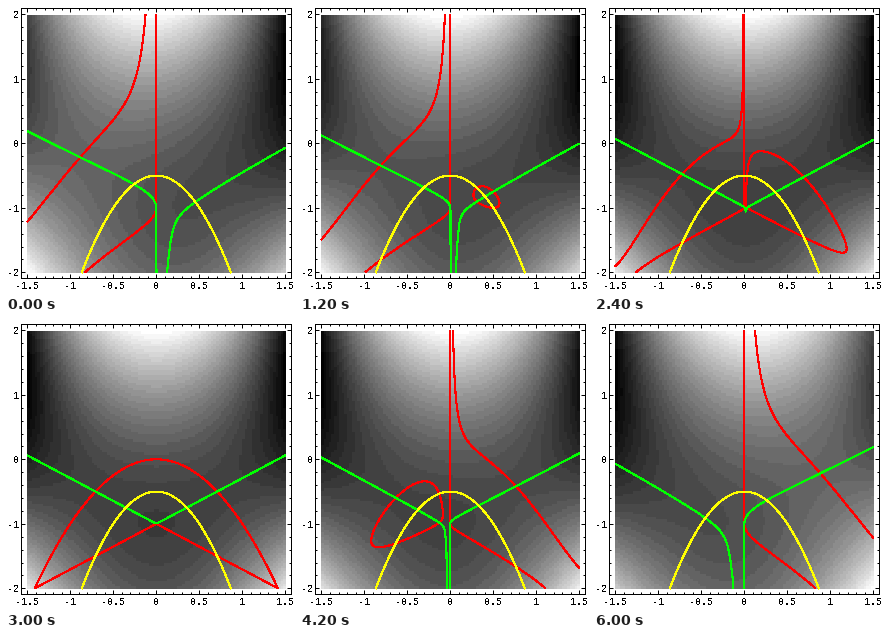
Recreate the animation shown at these times as a matplotlib script. Size 288 px wide and 288 px high, loop 6300 ms.

```python
import numpy as np
import matplotlib.pyplot as plt
from matplotlib.animation import FuncAnimation
from matplotlib.ticker import FormatStrFormatter, MultipleLocator

SIZE, DPI = 288, 72
XM, YM = 1.5, 2.0
# Pixel layout, y measured from the top
LEFT, RIGHT, TOP, BOTTOM = 15, 285, 2, 272
CX, CY = 150.3, 137.3
SX, SY = 86, 64.5
LEVELS = 32
LINE = 1.1

plt.rcParams.update({
    "font.family": "Liberation Mono",
    "font.size": 10,
    "text.antialiased": False,
    "axes.unicode_minus": False,
})

# Tilt of the surface: steps of 1/8, refined around zero
half = np.r_[np.arange(8, 0, -1) / 8, 1 / 16, 1 / 32]
TILT = np.r_[-half, 0, half[::-1]]


def data_box(left, right, top, bottom):
    """Pixel edges to data limits (x0, x1, y0, y1)."""
    return ((left - CX) / SX, (right - CX) / SX,
            (CY - bottom) / SY, (CY - top) / SY)


def grid(n):
    return np.meshgrid(np.linspace(-XM, XM, n), np.linspace(-YM, YM, n))


def potential(x, y, t):
    return y**2 + 2 * y - x**2 - 2 * x**2 * y + t * x


def slope_along(x, y, t, sign):
    """Gradient component along one Hessian eigenvector."""
    p = t - 2 * x - 4 * x * y
    q = 2 * (y + 1 - x**2)
    d = -4 * (y + 1)              # Vxx - Vyy
    b = -4 * x                    # Vxy
    return p * (d + sign * np.hypot(d, 2 * b)) / (2 * b) + q


def shade(t):
    v = potential(*CELLS, t)
    v = (v - v.min()) / (v.max() - v.min())
    return np.round(v * (LEVELS - 1)) / (LEVELS - 1)


CELLS = grid(100)
CURVES = [(grid(400), -1, "#ff0000"), (grid(100), 1, "#00ff00")]

fig = plt.figure(figsize=(SIZE / DPI, SIZE / DPI), dpi=DPI, facecolor="white")
ax = fig.add_axes([LEFT / SIZE, 1 - BOTTOM / SIZE,
                   (RIGHT - LEFT) / SIZE, (BOTTOM - TOP) / SIZE])
limits = data_box(LEFT, RIGHT, TOP, BOTTOM)

for axis, major, minor in ((ax.xaxis, 0.5, 0.1), (ax.yaxis, 1, 0.2)):
    axis.set_major_locator(MultipleLocator(major))
    axis.set_minor_locator(MultipleLocator(minor))
    axis.set_major_formatter(FormatStrFormatter("%g"))
ax.tick_params(which="both", direction="in", top=True, right=True, width=1)
ax.tick_params(which="major", length=4)
ax.tick_params(which="minor", length=2)
ax.tick_params(axis="x", pad=3)
ax.tick_params(axis="y", pad=2)
for spine in ax.spines.values():
    spine.set_linewidth(1)

image = ax.imshow(shade(0), cmap="gray", vmin=0, vmax=1, origin="lower",
                  extent=data_box(21, 280, 9, 267), aspect="auto",
                  interpolation="nearest", zorder=0)

# Zero set of the Hessian determinant
px = np.linspace(-np.sqrt(0.75), np.sqrt(0.75), 80)
ax.plot(px, -0.5 - 2 * px**2, color="#ffff00", lw=LINE,
        antialiased=False, zorder=4)
ax.axis(limits)
ax.autoscale(False)

drawn = []


def update(i):
    t = TILT[i]
    image.set_data(shade(t))
    while drawn:
        drawn.pop().remove()
    for (x, y), sign, color in CURVES:
        f = slope_along(x, y, t, sign)
        drawn.append(ax.contour(x, y, f, levels=[0], colors=[color],
                                linewidths=LINE, linestyles="solid",
                                antialiased=False, zorder=3))
    return [image, *drawn]


anim = FuncAnimation(fig, update, frames=len(TILT), init_func=lambda: [image],
                     interval=300, repeat=True, repeat_delay=0, blit=False)
plt.show()
```
